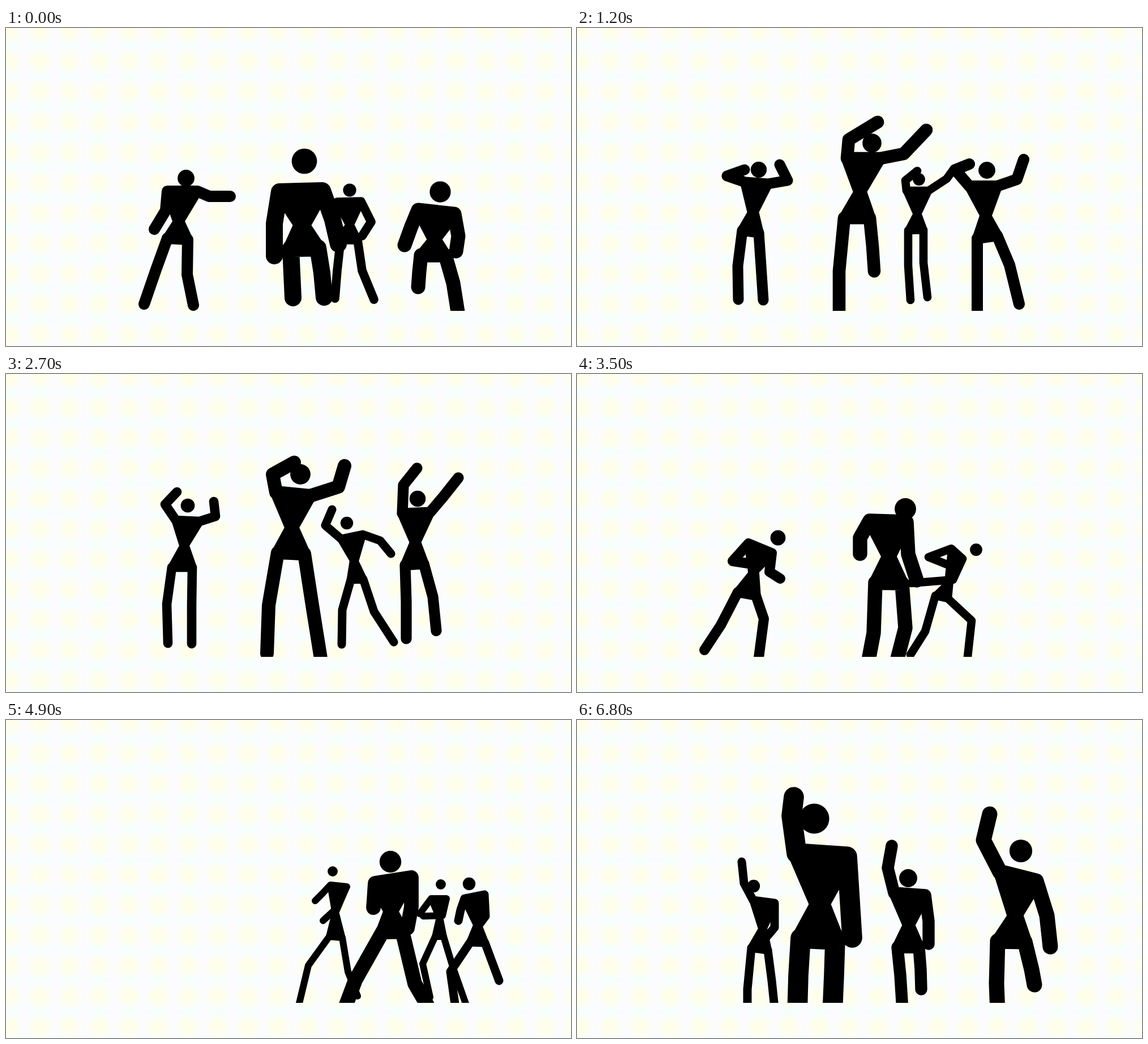
Animation of 998x561 px, one loop 6.9 s. Source, as an HTML page:

```html
<!DOCTYPE html>
<html lang="en">
<head>
<meta charset="utf-8">
<title>Dancing figures</title>
<style>
  html, body { margin: 0; width: 100%; height: 100%; overflow: hidden; }
  body {
    background:
      radial-gradient(closest-side, #ffffe9 25%, #ffffe900) -19.5px 32.5px / 52.55px 53.5px,
      radial-gradient(closest-side, #f5ffff 15%, #f5ffff00) -19.5px 57.5px / 52.55px 53.5px,
      #fcfcff;
  }
  svg { display: block; width: 100%; height: 100%; }
</style>
</head>
<body>
<svg viewBox="0 0 998 561">
  <clipPath id="floor"><rect width="998" height="499"/></clipPath>
  <g id="crowd" clip-path="url(#floor)"></g>
</svg>
<script>
const LOOP = 6900, STEP = 100;

// Point order within a pose: head, waist, arms from left hand to right hand,
// legs from left foot to right foot.
const PARENT = [[3, 4], [6, 5], [9, 10], [12, 11], [2, 3], [7, 6], [8, 9], [13, 12]];
const ROOTS = [0, 1, 4, 5, 10, 11];

const smooth = p => p * p * (3 - 2 * p);
const easeOut = p => 1 - (1 - p) ** 2;
const rushOut = p => 1 - (1 - p) ** 3;
const rushIn = p => p ** 3;

const keys = [];
function key(time, ease, beats, ...figures) {
  keys.push({ time, ease, beats, figures });
}

// A figure is its limb radius followed by head and waist, arms and legs.
function figure(r, body, arms, legs) {
  const flat = [...body, ...arms, ...legs];
  const points = [];
  for (let i = 0; i < flat.length; i += 2) points.push([flat[i], flat[i + 1]]);
  return { r, points };
}

key(0, smooth, 1,
  figure(10, [318,265, 305,341],
    [262,355, 282,322, 285,288, 338,288, 359,297, 396,297],
    [244,487, 264,429, 285,371, 321,373, 320,435, 331,489]),
  figure(15, [527,235, 523,348],
    [474,402, 474,345, 483,289, 559,287, 577,338, 587,381],
    [507,476, 505,433, 503,389, 551,388, 558,432, 562,475]),
  figure(7.8, [607,286, 607,347],
    [597,368, 582,342, 585,307, 627,306, 645,342, 629,367],
    [581,477, 585,428, 591,374, 621,374, 629,428, 650,479]),
  figure(12.5, [767,289, 757,373],
    [704,383, 716,350, 728,321, 792,328, 799,367, 795,394],
    [728,457, 730,430, 733,401, 776,401, 790,450, 799,507]));

key(1200, smooth, 1,
  figure(9.5, [321,250, 311,325],
    [296,250, 265,261, 297,272, 337,275, 372,269, 358,241],
    [285,479, 284,420, 292,357, 321,361, 325,420, 329,480]),
  figure(11.3, [521,203, 500,289],
    [531,166, 480,197, 477,230, 536,230, 577,222, 617,180],
    [463,508, 463,429, 472,335, 517,335, 522,385, 525,429]),
  figure(7.3, [604,267, 601,328],
    [601,252, 580,269, 582,287, 621,287, 653,266, 666,248],
    [589,480, 585,419, 585,357, 612,356, 612,414, 619,475]),
  figure(10, [724,251, 722,331],
    [693,240, 668,250, 693,279, 742,279, 777,267, 789,232],
    [707,508, 707,430, 707,371, 742,366, 764,418, 781,487]));

key(2700, smooth, 0,
  figure(8.3, [321,232, 315,303],
    [302,208, 281,230, 300,258, 342,260, 370,251, 367,225],
    [286,475, 284,406, 293,341, 329,341, 328,408, 328,476]),
  figure(12, [520,177, 505,271],
    [509,156, 471,177, 477,209, 537,215, 587,199, 598,162],
    [461,493, 464,408, 480,315, 527,317, 541,408, 557,508]),
  figure(7.5, [602,263, 615,330],
    [576,239, 564,267, 592,291, 630,283, 661,294, 680,317],
    [593,477, 594,416, 609,363, 631,362, 650,419, 685,473]),
  figure(9.6, [727,220, 723,297],
    [726,166, 702,196, 700,246, 749,244, 772,217, 799,183],
    [707,467, 707,402, 705,337, 738,335, 754,393, 760,453]));

key(3500, easeOut, 2,
  figure(9, [355,289, 312,350],
    [308,335, 275,330, 303,299, 344,316, 340,349, 359,361],
    [225,487, 254,443, 284,385, 316,391, 330,432, 320,508]),
  figure(12.7, [580,238, 551,322],
    [500,317, 500,289, 517,259, 582,261, 585,318, 600,364],
    [514,510, 524,457, 527,368, 574,369, 580,448, 564,510]),
  figure(7.3, [705,310, 657,367],
    [656,337, 621,323, 661,308, 681,326, 664,363, 590,369],
    [589,495, 615,454, 633,391, 655,396, 697,435, 689,508]));

key(4900, rushIn, 1,
  figure(6, [577,267, 582,340],
    [546,319, 559,306, 573,291, 602,294, 584,332, 560,354],
    [516,508, 534,433, 571,382, 594,384, 604,444, 621,487]),
  figure(12.9, [679,250, 680,338],
    [649,331, 650,318, 652,288, 716,278, 716,330, 709,367],
    [598,510, 617,459, 665,374, 700,373, 722,465, 744,503]),
  figure(6, [768,290, 766,350],
    [731,342, 733,339, 751,315, 778,315, 771,345, 737,346],
    [749,489, 736,430, 758,382, 773,382, 789,435, 814,506]),
  figure(7.5, [818,289, 833,362],
    [799,354, 803,335, 810,315, 845,308, 847,346, 832,366],
    [794,508, 785,444, 820,392, 846,393, 859,428, 871,460]));

key(5700, rushOut, 0,
  figure(7.3, [442,281, 494,352],
    [412,335, 445,327, 459,306, 489,300, 503,340, 520,360],
    [516,489, 483,449, 489,388, 515,385, 550,447, 604,487]),
  figure(12.9, [500,251, 535,333],
    [455,267, 485,299, 509,268, 565,261, 613,294, 613,326],
    [564,510, 525,457, 519,369, 554,366, 536,457, 535,510]),
  figure(6, [644,289, 650,350],
    [624,361, 633,340, 630,309, 661,309, 650,345, 685,351],
    [618,506, 636,433, 642,380, 658,380, 668,433, 705,482]),
  figure(7.5, [692,338, 722,372],
    [698,407, 698,365, 684,335, 705,327, 736,358, 740,402],
    [727,504, 701,455, 721,404, 742,402, 738,473, 800,474]));

key(6800, smooth, 0,
  figure(7.5, [312,293, 328,368],
    [291,250, 295,288, 311,318, 349,323, 349,366, 333,385],
    [301,508, 301,475, 308,402, 337,406, 344,460, 349,508]),
  figure(17.8, [419,174, 429,325],
    [383,136, 379,169, 388,235, 477,241, 482,320, 486,384],
    [389,520, 391,450, 395,385, 456,388, 454,450, 451,520]),
  figure(10.7, [585,279, 586,362],
    [556,222, 549,261, 560,305, 615,309, 621,355, 621,395],
    [575,512, 571,450, 566,401, 604,401, 607,440, 608,475]),
  figure(13.5, [784,231, 774,345],
    [729,166, 718,212, 747,268, 811,284, 830,345, 836,400],
    [743,515, 741,465, 743,390, 791,391, 803,440, 808,467]));

const mix = (a, b, p) => a + (b - a) * p;

function rotateMix(from, to, p, swing) {
  const a = Math.atan2(from[1], from[0]), b = Math.atan2(to[1], to[0]);
  const turn = Math.atan2(Math.sin(b - a), Math.cos(b - a));
  const angle = a + turn * p + swing;
  const length = mix(Math.hypot(...from), Math.hypot(...to), p);
  return [length * Math.cos(angle), length * Math.sin(angle)];
}

function blend(a, b, p, sway) {
  const points = [];
  for (const i of ROOTS) points[i] = a.points[i].map((v, k) => mix(v, b.points[i][k], p));
  for (const [i, j] of PARENT) {
    const bone = f => f.points[i].map((v, k) => v - f.points[j][k]);
    const swing = sway * (i < 8 ? 0.2 : i < 11 ? 0.12 : -0.12);
    const offset = rotateMix(bone(a), bone(b), p, swing);
    points[i] = points[j].map((v, k) => v + offset[k]);
  }
  return { r: mix(a.r, b.r, p), points };
}

const crowd = document.getElementById("crowd");
function add(tag, parent, attributes = {}) {
  const node = document.createElementNS("http://www.w3.org/2000/svg", tag);
  set(node, attributes);
  return parent.appendChild(node);
}
function set(node, attributes) {
  for (const name in attributes) node.setAttribute(name, attributes[name]);
}

const people = keys[0].figures.map(() => {
  const group = add("g", crowd);
  return {
    group,
    head: add("circle", group),
    torso: add("polygon", group),
    limbs: add("path", group, {
      fill: "none", stroke: "#000", "stroke-linecap": "round", "stroke-linejoin": "round"
    })
  };
});

// Moves both ends of a line outwards by the given distance.
function widen([x1, y1], [x2, y2], by) {
  const length = Math.hypot(x2 - x1, y2 - y1) || 1;
  const dx = (x2 - x1) / length * by, dy = (y2 - y1) / length * by;
  return [[x1 - dx, y1 - dy], [x2 + dx, y2 + dy]];
}

function draw(person, { r, points }) {
  const [head, [wx, wy]] = points;
  const [leftShoulder, rightShoulder] = widen(points[4], points[5], r);
  const [leftHip, rightHip] = widen(points[10], points[11], r);
  const waist = r * 1.1;
  set(person.head, { cx: head[0], cy: head[1], r: r * 1.49 });
  set(person.torso, {
    points: [leftShoulder, rightShoulder, [wx + waist, wy], rightHip, leftHip, [wx - waist, wy]].join(" ")
  });
  set(person.limbs, {
    d: `M${points.slice(2, 8).join("L")}M${points.slice(8).join("L")}`,
    "stroke-width": r * 2
  });
}

function render(time) {
  const last = keys.length - 2;
  const next = keys.findIndex(k => k.time > time);
  const index = next < 0 ? last : next - 1;
  const from = keys[index], to = keys[index + 1];
  const p = Math.min(1, (time - from.time) / (to.time - from.time));
  const sway = Math.sin(2 * Math.PI * from.beats * p);
  people.forEach((person, i) => {
    const a = from.figures[i], b = to.figures[i];
    const visible = p < 0.5 ? a : b;
    person.group.style.display = visible ? "" : "none";
    if (visible) draw(person, blend(a || b, b || a, from.ease(p), sway));
  });
}

const start = performance.now();
function tick() {
  const time = (performance.now() - start) % LOOP;
  render(Math.floor(time / STEP) * STEP);
  requestAnimationFrame(tick);
}
tick();
</script>
</body>
</html>
```
